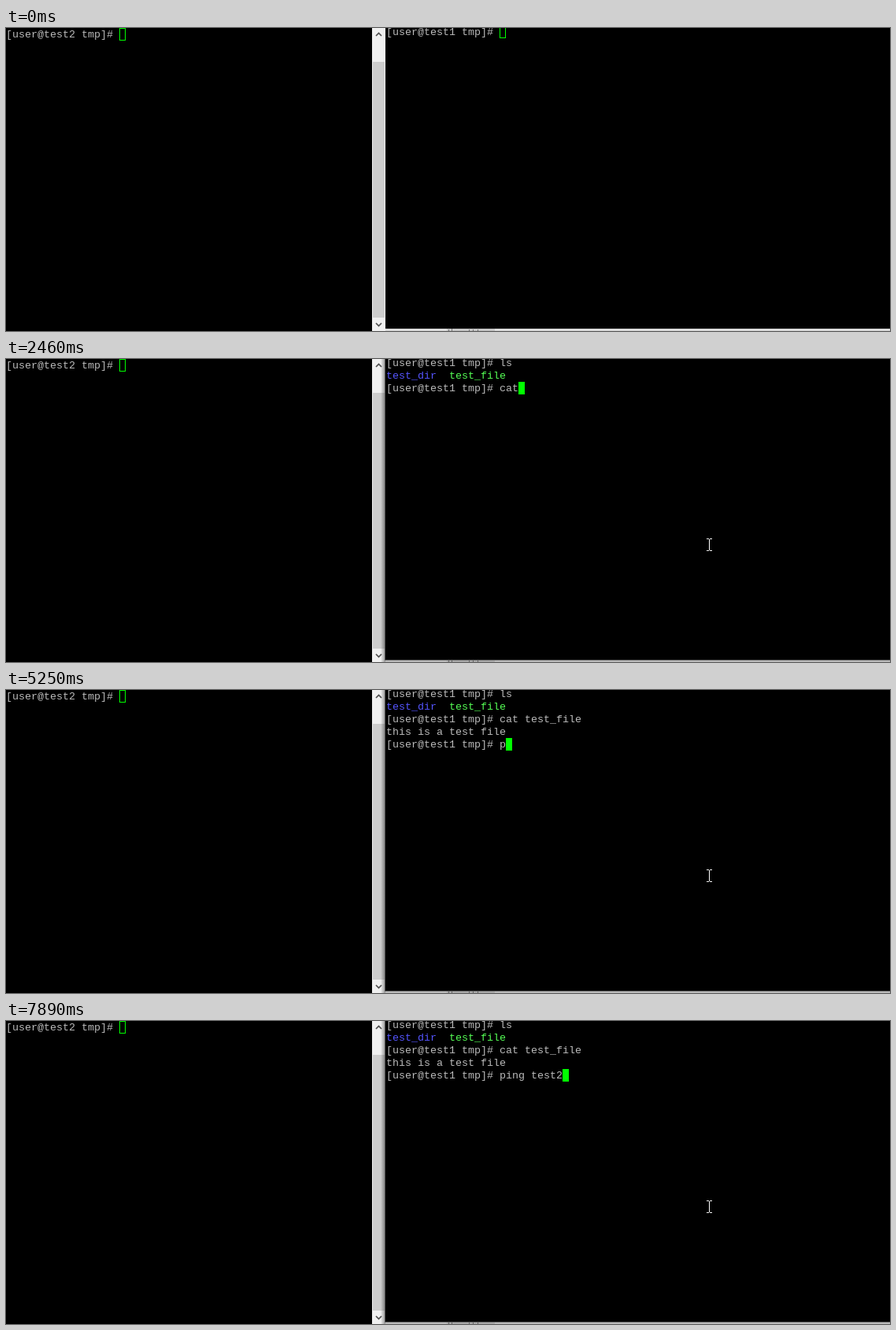
An HTML page for the animation above (8 s loop, 1123 by 385 pixels).

```html
<!DOCTYPE html>
<html lang="en">
<head>
<meta charset="utf-8">
<title>Two terminals</title>
<style>
html, body { margin: 0; width: 100%; height: 100%; overflow: hidden; background: #000; }
svg { display: block; width: 1123px; height: 385px; }
text { font: 13.3333px "Liberation Mono", "Courier New", monospace; white-space: pre; fill: #bbb; }
.dir { fill: #55f; }
.exe { fill: #5f5; }
</style>
</head>
<body>
<svg viewBox="0 0 1123 385" shape-rendering="crispEdges">
  <defs>
    <linearGradient id="shade">
      <stop offset="0" stop-opacity="0"/>
      <stop offset="1" stop-opacity=".4"/>
    </linearGradient>
  </defs>
  <rect width="1123" height="385"/>

  <text x="0" y="12">[user@test2 tmp]# </text>
  <rect x="144.5" y=".5" width="7" height="15" fill="none" stroke="#0f0"/>

  <g id="scrollbar">
    <rect x="465" width="17" height="385" fill="#f0f0f0"/>
    <rect x="466" y="43" width="15" height="325" fill="#cdcdcd"/>
    <g fill="none" stroke="#505050" stroke-width="1.7" shape-rendering="auto">
      <path d="M470 10l3.5-3.5 3.5 3.5"/>
      <path d="M470 375l3.5 3.5 3.5-3.5"/>
    </g>
  </g>

  <g id="edge">
    <rect x="482" y="382" width="641" height="3" fill="#dcdcdc"/>
    <rect x="560" y="382" width="61" height="3" fill="#c6c6c6"/>
    <path d="M562.5 383v2M566.5 382v3M588.5 383v2M593.5 383v2M599.5 383v2" stroke="#777"/>
  </g>
  <g id="focus">
    <rect x="476" width="6" height="385" fill="url(#shade)"/>
    <rect x="481" width="1" height="383" fill="#555"/>
    <rect x="482" y="382" width="641" height="1" fill="#555"/>
    <rect x="482" y="383" width="641" height="2" fill="#000" opacity=".15"/>
  </g>

  <g id="screen"></g>
  <rect id="caret"/>

  <circle id="click" cx="891" cy="235" r="12" fill="#7f7f00" shape-rendering="auto"/>
  <path id="mouse" d="M-3 -7.5h3M1 -7.5h3M.5 -7v14M-3 7.5h3M1 7.5h3" fill="none" stroke="#fff"/>
</svg>
<script>
const LOOP = 8000, LEFT = 483, TOP = -3, CELL = 8, ROW = 16;
const PROMPT = "[user@test1 tmp]# ";
const $ = id => document.getElementById(id);

// Each command: keystrokes as [time, text typed so far], then Enter and its output.
const commands = [
  { keys: [[1390, "l"], [1450, "ls"]], enter: 1620,
    output: '<tspan class="dir">test_dir</tspan>  <tspan class="exe">test_file</tspan>' },
  { keys: [[2000, "c"], [2150, "ca"], [2460, "cat"], [2540, "cat "], [2690, "cat t"],
           [2770, "cat te"], [2850, "cat tes"], [3000, "cat test_"],
           [3780, "cat test_f"], [3860, "cat test_file "]], enter: 4240,
    output: "this is a test file" },
  { keys: [[5250, "p"], [5800, "pi"], [6350, "pin"], [6500, "ping"], [6960, "ping "],
           [7360, "ping t"], [7440, "ping te"], [7510, "ping tes"], [7590, "ping test"],
           [7890, "ping test2"]], enter: Infinity }
];
const mousePath = [[250, 946, 308], [310, 918, 270], [380, 893, 236]];

const latest = (list, t) => list.filter(item => item[0] <= t).pop();
const show = (el, on) => el.setAttribute("visibility", on ? "visible" : "hidden");
const set = (el, attrs) => {
  for (const name in attrs) el.setAttribute(name, attrs[name]);
};

let shown = "";

function draw(t) {
  const lines = [];
  for (const { keys, enter, output } of commands) {
    const typed = latest(keys, t);
    lines.push(PROMPT + (typed ? typed[1] : ""));
    if (t < enter) break;
    lines.push(output);
  }
  const html = lines.map((line, i) =>
    `<text x="${LEFT}" y="${TOP + i * ROW + 12}">${line}</text>`).join("");
  if (html !== shown) $("screen").innerHTML = shown = html;

  const row = lines.length - 1;
  const x = LEFT + lines[row].length * CELL, y = TOP + row * ROW;
  const focused = t >= 530;
  set($("caret"), focused
    ? { x, y, width: CELL, height: ROW, fill: "#0f0", stroke: "none" }
    : { x: x + .5, y: y + .5, width: CELL - 1, height: ROW - 1, fill: "none", stroke: "#0f0" });

  show($("focus"), focused);
  show($("click"), focused && t < 610);
  const at = latest(mousePath, t);
  show($("mouse"), at);
  if (at) $("mouse").setAttribute("transform", `translate(${at[1]} ${at[2]})`);
}

const start = performance.now();
function tick() {
  draw((performance.now() - start) % LOOP);
  requestAnimationFrame(tick);
}
tick();
</script>
</body>
</html>
```
